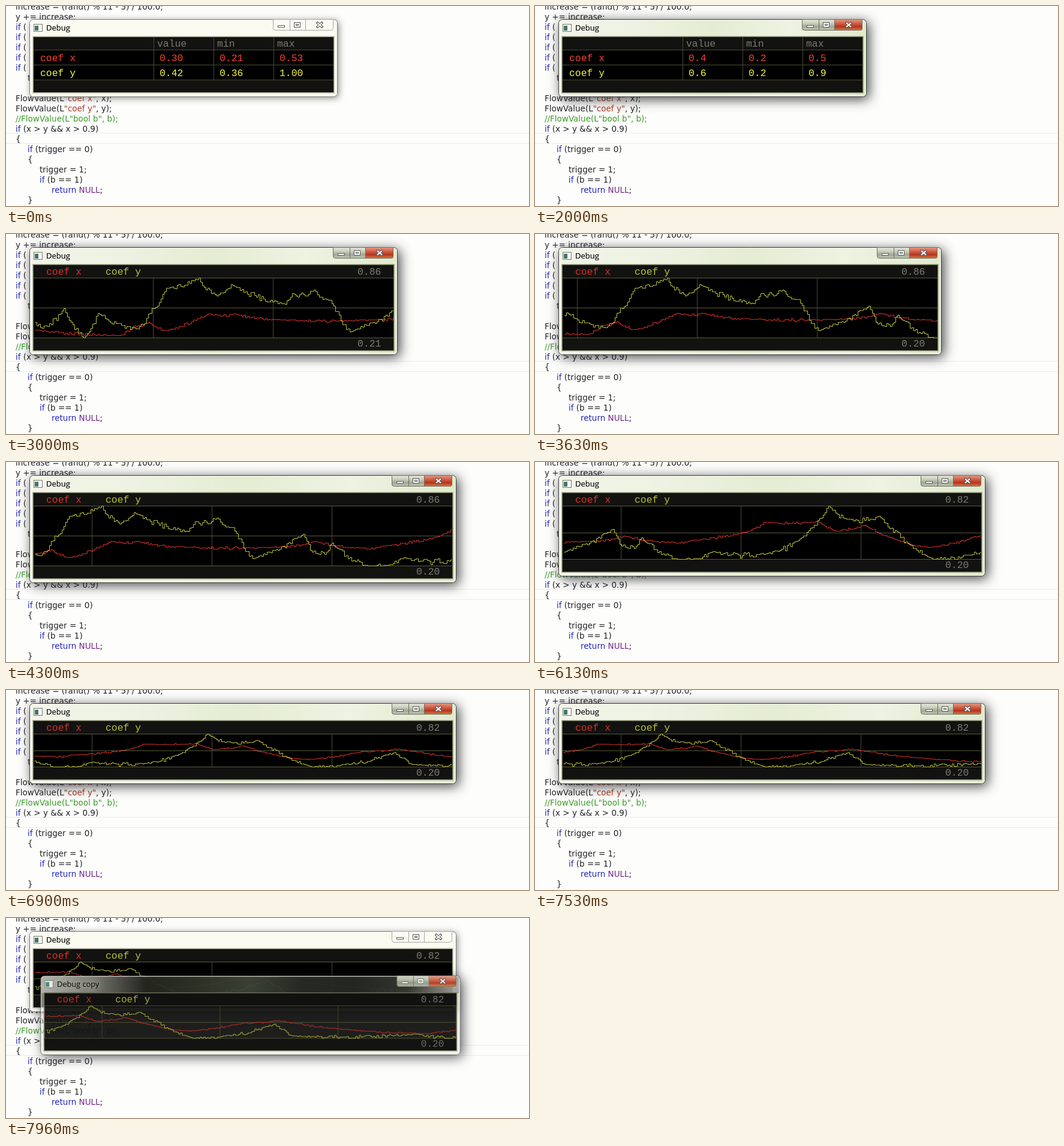
These frames come from a looping animation (872x334 px, 8 s). An HTML page with a canvas:

```html
<!DOCTYPE html>
<html lang="en">
<head>
<meta charset="utf-8">
<title>Debug</title>
<style>
  html, body { margin: 0; width: 100%; height: 100%; overflow: hidden; background: #fdfdfb; }
  canvas { display: block; }
</style>
</head>
<body>
<canvas id="stage" width="872" height="334"></canvas>
<script>
const ctx = document.getElementById('stage').getContext('2d');
const LOOP = 8000, SPEED = 0.2, SAMPLE = 3;   // ms, px per ms, px per sample
const MONO = '16.4px "Liberation Mono", monospace';
const CODE = '13.5px "DejaVu Sans", sans-serif';
const UI = '13px "Open Sans", sans-serif';
const PAPER = '#fdfdfb', GRID = '#4a4a34', DIM = '#7c7c70', BAND = '#121210';

// Turning points as [px along the time axis, percent]; seeded jitter fills in the rest.
const series = [
  { name: 'coef x', color: '#d8302a', bright: '#f8402c', jitter: 3, seed: 1,
    points: [[-399, 53], [-201, 21], [-99, 47], [0, 30], [144, 24], [168, 34], [192, 38], [222, 29],
      [291, 47], [336, 47], [408, 41], [576, 41], [630, 47], [711, 40], [744, 42], [840, 53], [864, 63],
      [954, 64], [984, 53], [1032, 60], [1080, 44], [1140, 34], [1230, 49], [1290, 54], [1392, 38],
      [1536, 29], [1590, 36]] },
  { name: 'coef y', color: '#bcc438', bright: '#f4f440', jitter: 7, seed: 7,
    points: [[-399, 100], [-201, 60], [-99, 36], [0, 42], [18, 34], [51, 53], [84, 21.2], [108, 48],
      [174, 31], [222, 75], [276, 86], [303, 68], [330, 79], [417, 58], [432, 69], [468, 73], [495, 62],
      [528, 28], [612, 55], [636, 33], [660, 45], [720, 20], [780, 29], [870, 27], [927, 45], [972, 82],
      [1008, 67], [1056, 70], [1140, 22], [1200, 25], [1284, 47], [1320, 24], [1524, 28], [1620, 21]] }
];

const clamp01 = p => Math.max(0, Math.min(1, p));
const mix = (a, b, p) => a + (b - a) * p;
const ease = (t, from, to) => { const p = clamp01((t - from) / (to - from)); return p * p * (3 - 2 * p); };
const hash = n => { const s = Math.sin(n * 12.9898) * 43758.5453; return s - Math.floor(s); };

function valueAt(s, i) {
  const u = i * SAMPLE, next = s.points.findIndex(point => point[0] > u);
  if (next <= 0) return s.points.at(next)[1] / 100;
  const [u0, v0] = s.points[next - 1], [u1, v1] = s.points[next];
  const p = (u - u0) / (u1 - u0);
  const dip = u > 0 ? hash(i + s.seed * 100) * s.jitter * Math.min(1, 4 * p * (1 - p)) : 0;
  return Math.max(20, mix(v0, v1, p) - dip) / 100;
}

function recent(s, t, width) {
  const last = Math.floor(t * SPEED / SAMPLE), first = Math.ceil((t * SPEED - width) / SAMPLE);
  return Array.from({ length: last - first + 1 }, (_, k) => valueAt(s, first + k));
}

function rect(x, y, w, h, fill) { ctx.fillStyle = fill; ctx.fillRect(x, y, w, h); }

function text(str, x, y, font, fill) {
  ctx.font = font;
  ctx.fillStyle = fill;
  ctx.fillText(str, x, y);
}

function gradient(x1, y1, ...colors) {
  const g = ctx.createLinearGradient(0, 0, x1, y1);
  colors.forEach((c, i) => g.addColorStop(i / (colors.length - 1), c));
  return g;
}

const INK = '#24242a', BLUE = '#2428b4', RED = '#a83c24', GREEN = '#3c9a2c', PURPLE = '#702488';
const plain = str => [[str, INK]];
const condition = rest => [['if', BLUE], [' (' + rest, INK]];
const call = v => [['FlowValue(L', INK], [`"coef ${v}"`, RED], [`, ${v});`, INK]];
const code = [
  [16, plain('increase = (rand() % 11 - 5) / 100.0;')],
  [16, plain('y += increase;')],
  ...Array(5).fill([16, condition('')]),
  [36, plain('t')],
  [16, []],
  [16, call('x')],
  [16, call('y')],
  [16, [['//FlowValue(L"bool b", b);', GREEN]]],
  [16, condition('x > y && x > 0.9)')],
  [16, plain('{')],
  [36, condition('trigger == 0)')],
  [36, plain('{')],
  [56, plain('trigger = 1;')],
  [56, condition('b == 1)')],
  [76, [['return ', BLUE], ['NULL', PURPLE], [';', INK]]],
  [36, plain('}')],
  [16, plain('}')]
];

function drawCode() {
  rect(0, 0, 872, 334, PAPER);
  for (const y of [212, 229]) rect(0, y, 872, 1, '#eaeaf4');
  code.forEach(([x, parts], row) => {
    for (const [str, color] of parts) {
      text(str, x, 6 + row * 17, CODE, color);
      x += ctx.measureText(str).width;
    }
  });
}

function drawTable(t, w, h) {
  rect(0, 0, w, h, '#000');
  rect(0, 0, w, 21, BAND);
  rect(0, 72, w, h - 72, BAND);
  for (const x of [200, 300, 400]) rect(x, 0, 1, 72, GRID);
  for (const y of [21, 46, 71]) rect(0, y, w, 1, GRID);
  ['value', 'min', 'max'].forEach((label, i) => text(label, 206 + i * 100, 16, MONO, DIM));
  series.forEach((s, row) => {
    const y = 40 + row * 25, data = recent(s, t, 500);
    text(s.name, 11, y, MONO, s.bright);
    [data.at(-1), Math.min(...data), Math.max(...data)].forEach((v, i) =>
      text(v.toFixed(t < 1250 ? 2 : 1), 210 + i * 100, y, MONO, s.bright));
  });
}

function drawGraph(t, w, h) {
  const top = 21, bottom = h - 21, right = w - 1;
  const lines = series.map(s => recent(s, t, right));
  const all = lines.flat(), low = Math.min(...all), high = Math.max(...all);
  rect(0, 0, w, h, '#000');
  rect(0, 0, w, top, BAND);
  rect(0, bottom, w, h - bottom, BAND);
  for (const y of [top, Math.round((top + bottom) / 2), bottom]) rect(0, y, w, 1, '#58583c');
  for (let x = right - 200; x > 0; x -= 200) rect(x, top, 1, bottom - top, GRID);

  const start = Math.ceil((t * SPEED - right) / SAMPLE) * SAMPLE;
  lines.forEach((line, n) => {
    ctx.beginPath();
    line.forEach((v, i) => {
      const x = Math.round(right - t * SPEED + start + i * SAMPLE) + 0.5;
      const y = Math.round(mix(bottom, top, (v - low) / (high - low))) + 0.5;
      ctx.lineTo(x, y);
      ctx.lineTo(Math.min(x + SAMPLE, right + 0.5), y);
    });
    ctx.strokeStyle = series[n].color;
    ctx.lineWidth = 1;
    ctx.stroke();
    text(series[n].name, 21 + n * 99, 16, MONO, series[n].color);
  });
  text(high.toFixed(2), w - 60, 16, MONO, DIM);
  text(low.toFixed(2), w - 60, h - 6, MONO, DIM);
}

function drawButtons(right, active) {
  const left = right - 101;
  ctx.save();
  ctx.beginPath();
  ctx.roundRect(left, 0, 101, 19, [0, 0, 4, 4]);
  ctx.clip();
  rect(left, 0, 101, 19, active ? gradient(0, 19, '#e4e8d8', '#cdd2c0', '#a0a694', '#c6ccb4') : '#fbfbf4');
  if (active) rect(right - 46, 0, 46, 19, gradient(0, 19, '#e8a08c', '#d4644c', '#b4341c', '#dc8444'));
  ctx.restore();
  ctx.strokeStyle = active ? '#6c6c60' : '#a8a8a0';
  ctx.lineWidth = 1;
  ctx.beginPath();
  ctx.roundRect(left + 0.5, 0.5, 100, 18, [0, 0, 4, 4]);
  for (const x of [left + 28.5, right - 46.5]) { ctx.moveTo(x, 1); ctx.lineTo(x, 18); }
  ctx.stroke();

  const white = active ? '#fff' : PAPER;
  const box = (x, y, w, h) => {
    rect(x, y, w, h, white);
    ctx.strokeStyle = '#5a5a58';
    ctx.strokeRect(x + 0.5, y + 0.5, w - 1, h - 1);
  };
  box(left + 8, 10, 12, 4);
  box(left + 35, 5, 11, 9);
  box(left + 38, 8, 5, 3);
  const cx = right - 23, cy = 9.5;
  for (const [color, width, reach] of [['#5a5a58', 4, 5], [white, 2, 4]]) {
    ctx.strokeStyle = color;
    ctx.lineWidth = width;
    ctx.beginPath();
    for (const side of [-1, 1]) {
      ctx.moveTo(cx - reach * side, cy - reach + 0.5);
      ctx.lineTo(cx + reach * side, cy + reach - 0.5);
    }
    ctx.stroke();
  }
}

// The origin is the outer corner; w and h measure the client area.
function drawWindow(title, w, h, active, glass, content) {
  const W = w + 14, H = h + 38;
  const shape = () => { ctx.beginPath(); ctx.roundRect(0.5, 0.5, W - 1, H - 1, 6); };
  ctx.save();
  ctx.shadowColor = active ? 'rgba(30,30,36,.85)' : 'rgba(70,70,76,.65)';
  ctx.shadowBlur = active ? 20 : 12;
  ctx.shadowOffsetX = ctx.shadowOffsetY = active ? 4 : 2;
  if (glass) {
    // Cast the shadow outside only, so the pane stays see-through.
    const outside = new Path2D();
    outside.rect(-40, -40, W + 80, H + 80);
    outside.roundRect(0, 0, W, H, 6);
    ctx.clip(outside, 'evenodd');
  }
  shape();
  ctx.fillStyle = PAPER;
  ctx.fill();
  ctx.restore();

  shape();
  ctx.fillStyle = glass ? 'rgba(225,228,215,.6)'
    : active ? gradient(W, 0, '#f2f5e8', '#edf2e2', '#e4edd2', '#eef3e2', '#e0e9cc') : '#fafaf0';
  ctx.fill();
  if (glass) {
    rect(2, 2, W - 4, 28, gradient(W, 0, '#bcbcb6', '#77776f', '#161812', '#22261a', '#30382a',
      '#1a1c16', '#181a16', '#282a24', '#a8aaa2'));
  }
  shape();
  ctx.strokeStyle = active ? '#3a3a36' : '#7c7c74';
  ctx.lineWidth = 1;
  ctx.stroke();
  ctx.strokeStyle = 'rgba(255,255,250,.8)';
  ctx.beginPath();
  ctx.roundRect(1.5, 1.5, W - 3, H - 3, 5);
  ctx.stroke();

  rect(7, 8, 15, 13, '#77786f');
  rect(8, 9, 13, 11, '#f8f8f4');
  rect(9, 11, 6, 8, '#3f7768');
  ctx.save();
  ctx.shadowColor = glass ? '#b0b0aa' : '#fff';
  ctx.shadowBlur = 9;
  for (let i = 0; i < 2; i++) text(title, 28, 19, UI, '#161614');
  ctx.restore();
  drawButtons(W - 7, active);

  ctx.strokeStyle = active ? '#70745c' : '#9c9c8c';
  ctx.strokeRect(6.5, 29.5, w + 1, h + 1);
  ctx.save();
  ctx.beginPath();
  ctx.rect(7, 30, w, h);
  ctx.clip();
  ctx.translate(7, 30);
  content(w, h);
  ctx.restore();
}

function draw(t) {
  drawCode();
  const grow = ease(t, 2530, 2850);
  const w = Math.round(500 + 100 * grow + 98 * ease(t, 3450, 4000));
  const h = Math.round(92 + 50 * grow - 45 * ease(t, 5950, 6500));
  const graph = (gw, gh) => drawGraph(t, gw, gh);
  const table = (tw, th) => drawTable(t, tw, th);

  ctx.save();
  ctx.translate(39, 22);
  drawWindow('Debug', w, h, t > 400 && t < 7780, false, t < 2300 ? table : graph);
  ctx.restore();

  // The copy fades in while it grows to full size.
  const open = clamp01((t - 7800) / 250);
  if (!open) return;
  const rest = (1 - open) ** 2, scale = 1 - 0.13 * rest;
  ctx.save();
  ctx.globalAlpha = 1 - rest;
  ctx.translate(407.5, 162.5);
  ctx.scale(scale, scale);
  ctx.translate(-(w + 14) / 2, -(h + 38) / 2);
  drawWindow('Debug copy', w, h, true, true, graph);
  ctx.restore();
}

function frame() {
  draw(performance.now() % LOOP);
  requestAnimationFrame(frame);
}
frame();
</script>
</body>
</html>
```
